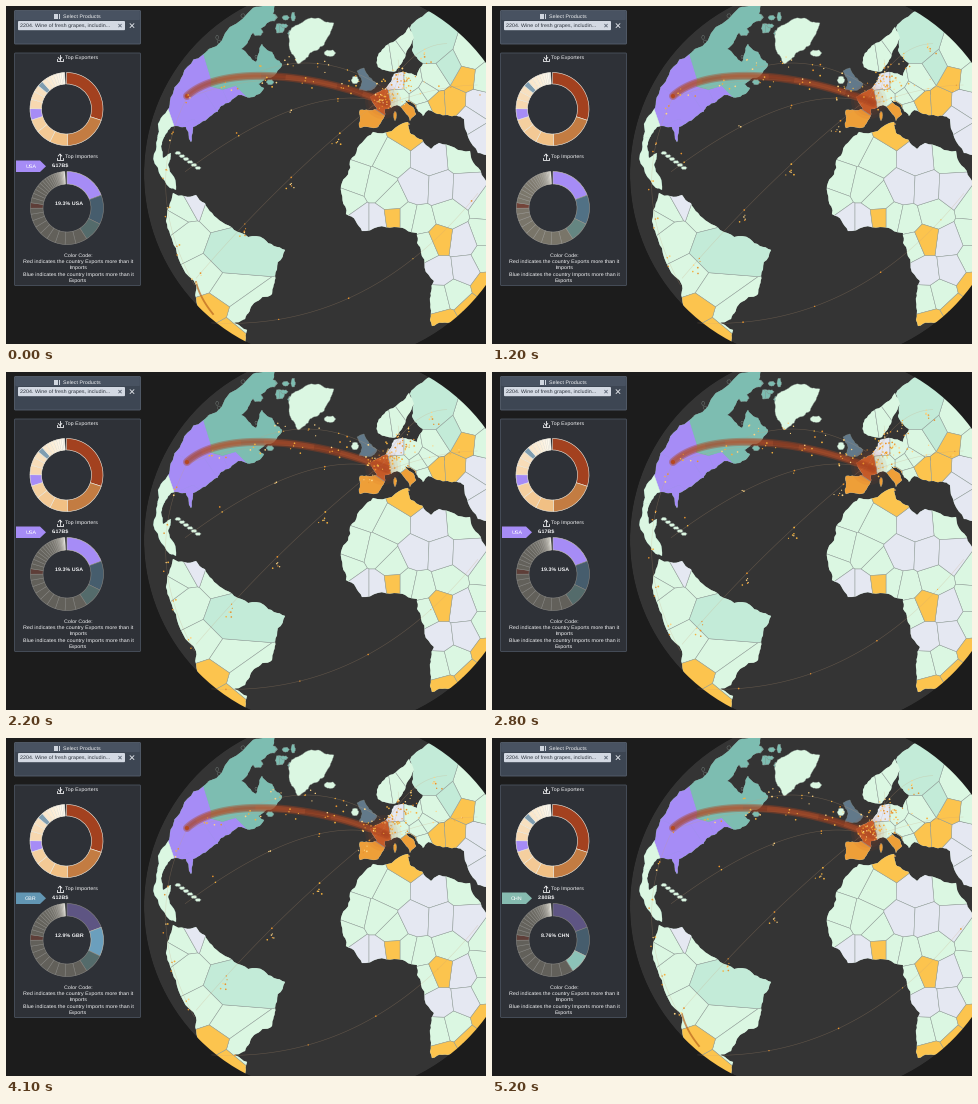
Write a matplotlib script that moves like this. It is 480x338 px and loops after 5300 ms.

```python
import numpy as np
import matplotlib.pyplot as plt
from matplotlib.animation import FuncAnimation
from matplotlib.colors import to_rgb
from matplotlib.patches import Circle, FancyBboxPatch, Polygon, Rectangle, Wedge

W, H = 480, 338
FRAMES, INTERVAL, PERIOD = 53, 100, 1700
BG, SEA, PANEL, INK = "#1c1c1c", "#343434", "#2e3137", "#f1f2f4"
MINT, PALE, TEAL, RUST = "#dbf7e2", "#c3ebd8", "#7dbdb1", "#c9622f"
LAV, YELLOW, AMBER = "#e5e8f2", "#fcc44e", "#ee9f38"
PURPLE, BLUE, SLATE = "#a68cf6", "#6b9fbd", "#62798a"
CENTER, RADIUS = (327, 168), 189

plt.rcParams.update({"font.family": "Liberation Sans", "text.hinting": "none"})
rng = np.random.default_rng(7)
fig = plt.figure(figsize=(4.8, 3.38), dpi=100, facecolor=BG)
ax = fig.add_axes([0, 0, 1, 1])
ax.set_xlim(0, W)
ax.set_ylim(H, 0)
ax.axis("off")


def mix(a, b, t):
    return tuple(np.array(to_rgb(a)) * (1 - t) + np.array(to_rgb(b)) * t)


# Globe
ax.add_patch(Circle(CENTER, RADIUS, fc=SEA, lw=0))
ax.add_patch(Wedge(CENTER, 500, 0, 360, width=500 - RADIUS, fc=BG, lw=0, zorder=2.8))


def rough(points, amount=0.12, rounds=3):
    """Subdivide a closed outline with random offsets, like a coast."""
    p = np.array(points, float)
    for _ in range(rounds):
        d = np.roll(p, -1, axis=0) - p
        normal = np.stack([-d[:, 1], d[:, 0]], axis=1)
        mid = p + d / 2 + normal * rng.uniform(-amount, amount, (len(p), 1))
        p = np.stack([p, mid], axis=1).reshape(-1, 2)
    return p


def cell(seed, seeds):
    """Part of the stage that lies nearer to seed than to the other seeds."""
    poly = [np.array(c, float) for c in ((0, -50), (600, -50), (600, 400), (0, 400))]
    for other in seeds:
        if other == seed:
            continue
        normal = np.subtract(other, seed)
        limit = normal @ np.add(other, seed) / 2
        kept = []
        for a, b in zip(poly, poly[1:] + poly[:1]):
            da, db = normal @ a - limit, normal @ b - limit
            if da <= 0:
                kept.append(a)
            if da * db < 0:
                kept.append(a + (b - a) * da / (da - db))
        poly = kept
    return poly


def land(color, outline, countries=None, border="#8f9a96"):
    """Coast outline, split into countries around seed points."""
    shape = ax.add_patch(Polygon(rough(outline), fc=color, ec="#7f8a85", lw=0.25, zorder=2))
    countries = countries or {}
    seeds = [s for group in countries.values() for s in group]
    for fill, group in countries.items():
        for seed in group:
            part = Polygon(cell(seed, seeds), fc=fill, ec=border or fill, lw=0.35, zorder=2.1)
            ax.add_patch(part).set_clip_path(shape)


def blob(x, y, rx, ry, color):
    a = np.linspace(0, 2 * np.pi, 7)[:-1]
    land(color, np.stack([x + rx * np.cos(a), y + ry * np.sin(a)], axis=1))


# North America
land(TEAL, [(247, 2), (203, 43), (177, 69), (164, 95), (152, 118), (148, 148), (164, 182),
            (170, 184), (162, 159), (165, 147), (157, 152), (156, 136), (165, 121),
            (180, 121), (185, 136), (187, 121), (206, 109), (215, 100), (232, 89),
            (247, 91), (258, 82), (252, 78), (266, 71), (276, 58), (266, 46), (256, 38),
            (250, 56), (235, 43), (245, 29), (266, 13), (270, -3)],
     {PURPLE: [(190, 70), (215, 95), (174, 105), (184, 128), (200, 105), (226, 90)],
      TEAL: [(216, 62), (221, 73), (240, 76), (230, 40)],
      MINT: [(154, 112), (160, 150)]}, border=None)
for _ in range(9):
    x, y = rng.normal((272, 22), (8, 11))
    blob(x, y, *rng.uniform(2, 5.5, 2), TEAL)
for _ in range(8):
    x, y = rng.normal((228, 36), (13, 13))
    blob(x, y, *rng.uniform(0.8, 2.2, 2), SEA)
for k in range(4):
    blob(205 + 5 * k, 79 + 1.6 * k, 3, 1.6, SEA)
for k in range(6):
    blob(172 + 4 * k, 147 + 3 * k, 3.2, 1.7, MINT)
blob(264, 76, 4, 3, TEAL)
land(MINT, [(283, 26), (298, 15), (313, 12), (328, 17), (318, 39), (304, 47), (292, 58),
            (284, 44)])
blob(324, 47, 6, 3.5, MINT)

# South America
land(MINT, [(167, 187), (190, 189), (206, 207), (228, 224), (258, 233), (279, 244),
            (269, 270), (266, 288), (248, 297), (239, 313), (228, 317), (241, 324),
            (236, 345), (212, 342), (195, 305), (190, 279), (170, 242), (160, 215)],
     {MINT: [(174, 202), (178, 232), (198, 272), (219, 286), (236, 310), (210, 200),
             (166, 216)],
      PALE: [(222, 248)], LAV: [(190, 193)], YELLOW: [(208, 302), (222, 327)]})

# Europe and western Asia
land(MINT, [(354, 104), (371, 103), (364, 91), (380, 82), (388, 68), (411, 70), (417, 57),
            (406, 44), (404, 22), (425, 5), (490, 0), (490, 152), (472, 147), (458, 113),
            (442, 109), (422, 104), (417, 110), (409, 99), (399, 94), (410, 108),
            (404, 115), (391, 99), (379, 103), (372, 121), (354, 122)],
     {AMBER: [(362, 112), (404, 106)], RUST: [(375, 93)],
      LAV: [(391, 77), (472, 98), (463, 112), (477, 135)],
      MINT: [(405, 77), (414, 90), (418, 104), (428, 73), (420, 86), (463, 53), (478, 72),
             (392, 90)],
      YELLOW: [(431, 98), (447, 97), (459, 70)], PALE: [(428, 42), (445, 62)]})
blob(440, 85, 10, 4.5, SEA)
blob(470, 85, 4, 9, SEA)
land(MINT, [(372, 61), (371, 52), (384, 37), (403, 21), (408, 32), (397, 54), (390, 65)],
     {MINT: [(378, 50), (391, 48), (402, 40)]})
land(SLATE, [(353, 84), (356, 75), (351, 65), (358, 62), (371, 78), (367, 83)])
blob(349, 74, 4, 4, MINT)
blob(401, 118, 3, 1.6, AMBER)
blob(389, 110, 1.6, 5, AMBER)

# Africa
land(MINT, [(367, 126), (402, 116), (405, 128), (425, 143), (433, 137), (464, 145),
            (478, 172), (495, 196), (495, 280), (470, 300), (447, 316), (426, 320),
            (424, 295), (428, 275), (415, 246), (411, 227), (388, 221), (356, 225),
            (340, 208), (335, 180), (344, 155), (361, 131)],
     {MINT: [(385, 152), (362, 140), (350, 175), (372, 180), (386, 194), (401, 212),
             (415, 215), (420, 239), (458, 150), (482, 200), (442, 208), (480, 227),
             (480, 252), (433, 292), (449, 288), (342, 197)],
      LAV: [(424, 153), (411, 182), (434, 183), (460, 184), (354, 214), (372, 214),
            (456, 236), (434, 266), (459, 263)],
      YELLOW: [(402, 124), (387, 212), (434, 233), (440, 318), (464, 304), (482, 280)]})


# Trade routes
def bezier(points, u):
    """Curve through any number of control points at u."""
    p = [np.asarray(q, float) for q in points]
    u = np.asarray(u)[..., None]
    while len(p) > 1:
        p = [a * (1 - u) + b * u for a, b in zip(p, p[1:])]
    return p[0]


HUB, EAST, ANDES = (378, 95), (181, 90), (192, 278)
# start, control, end, dots per lane, lanes, spread
ROUTES = [
    (HUB, (285, 170), ANDES, 4, 6, 11),
    (HUB, (300, 90), (178, 160), 4, 2, 10),
    (HUB, (290, 52), EAST, 5, 5, 8),
    (HUB, (320, 45), (250, 62), 4, 5, 10),
    (HUB, (400, 50), (445, 40), 3, 7, 9),
    (HUB, (390, 75), (400, 75), 3, 18, 20),
    (HUB, (430, 60), (470, 85), 3, 3, 10),
    (ANDES, (135, 185), EAST, 5, 3, 6),
    ((205, 318), (360, 325), (470, 190), 4, 1, 4),
]
u_line = np.linspace(0, 1, 60)
lanes = []
for start, bend, end, count, copies, spread in ROUTES:
    for n in range(copies):
        curve = [np.add(q, rng.normal(0, spread * s, 2))
                 for q, s in ((start, 0.45), (bend, 0.8), (end, 0.5))]
        lanes.append((curve, count, rng.uniform(-0.15, 0.15)))
        if n == 0:
            ax.plot(*bezier(curve, u_line).T, color="#c9a078", lw=0.4, alpha=0.3, zorder=3)

for r in range(3, 19, 3):
    ax.add_patch(Circle((377, 95), r, fc="#c4481c", alpha=0.07, lw=0, zorder=3.1))

BAND = [EAST, (215, 58), (310, 67), (381, 97)]
for width, alpha in ((5.8, 0.38), (4, 0.42), (1.5, 0.25)):
    ax.plot(*bezier(BAND, u_line).T, color="#a8421f", lw=width, alpha=alpha, zorder=3.2,
            solid_capstyle="round")
pulses = [ax.plot([], [], color="#d0693a", lw=3.6, alpha=0.2, zorder=3.3)[0] for _ in range(3)]
ax.add_patch(Circle(EAST, 2, fc="#b5481f", lw=0, zorder=3.3))
streak, = ax.plot(*bezier([(190, 276), (194, 292), (207, 308)], u_line).T, color="#b8651f",
                  lw=1.3, alpha=0.7, zorder=3.3)

n_dots = sum(count for _, count, _ in lanes)
dots = ax.scatter(np.zeros(n_dots), np.zeros(n_dots), s=rng.uniform(0.6, 1.7, n_dots),
                  c=rng.choice(["#f5b23e", "#e8932e", "#ffd584"], n_dots), lw=0, zorder=4)


# Side panels
def text(x, y, s, color=INK, ha="center", **kw):
    return ax.text(x, y, s, color=color, ha=ha, va="center", fontsize=5.4 * 0.72,
                   zorder=7, **kw)


def box(x, y, w, h, fc, ec="none", r=1):
    ax.add_patch(FancyBboxPatch((x + r, y + r), w - 2 * r, h - 2 * r, fc=fc, ec=ec, lw=0.6,
                                boxstyle=f"round,pad={r}", zorder=5))


def stroke(xs, ys, color=INK, lw=0.6):
    ax.plot(xs, ys, color=color, lw=lw, zorder=7)


def tray_icon(x, y, up):
    stroke([x - 3.3, x - 3.3, x + 3.3, x + 3.3], [y + 0.8, y + 3, y + 3, y + 0.8])
    stroke([x, x], [y - 3, y + 1.5])
    tip, base = (y - 3, y - 1) if up else (y + 1.5, y - 0.5)
    stroke([x - 1.8, x, x + 1.8], [base, tip, base])


def cross(x, y, r, color):
    for s in (-1, 1):
        stroke([x - r, x + r], [y - s * r, y + s * r], color)


box(8.5, 4.5, 126, 33.5, "#3d4653", "#56606e")
box(9.2, 5, 124.6, 9, "#485261")
for k in range(3):
    ax.add_patch(Rectangle((48 + 2.3 * k, 7.5), 1.8, 5, fc="#cfd5de", lw=0, zorder=6))
text(76, 10.2, "Select Products")
box(12, 15, 107, 9.2, "#d3d9e3")
text(14.5, 19.6, "2204. Wine of fresh grapes, includin...", "#2c333d", "left")
cross(114, 19.6, 1.3, "#5c6675")
cross(126, 19.6, 1.9, "#e6e9ee")

box(8.5, 47, 126, 232.5, PANEL, "#4b535f")
for y, name, up in ((52, "Top Exporters", False), (151, "Top Importers", True)):
    tray_icon(54, y, up)
    text(75.5, y, name)
NOTE = """Color Code:
Red indicates the country Exports more than it
Imports
Blue indicates the country Imports more than it
Exports"""
for k, line in enumerate(NOTE.splitlines()):
    text(72, 249.2 + 6.4 * k, line)


def shrinking(n, ratio, total):
    sizes = ratio ** np.arange(n)
    return list(sizes * total / sizes.sum())


def donut(center, sizes, colors, width):
    """Clockwise ring of slices starting at the top."""
    edges = np.concatenate([[0], np.cumsum(sizes)]) - 90
    return [ax.add_patch(Wedge(center, 36.5, a, b, width=width, fc=c, ec="#f4f1e6",
                               lw=0.4, zorder=6))
            for a, b, c in zip(edges, edges[1:], colors)]


creams = [mix("#f1c084", "#fffdf4", (k / 15) ** 0.7) for k in range(16)]
creams[3], creams[7] = PURPLE, "#7f9db0"
donut((60.5, 103), [108, 70] + shrinking(16, 0.85, 179), ["#a3411f", "#c37c42"] + creams, 11.5)

TAIL = 28
fade = np.concatenate([[0, 0, 0], np.linspace(0, 1, TAIL) ** 5])
import_colors = [PURPLE, BLUE, "#8cc3b8"] + [mix("#b0a68e", "white", t) for t in fade[3:]]
import_colors[12] = "#a5523a"
slices = donut((61, 202), [69.5, 46.5, 31.5] + shrinking(TAIL, 0.92, 209), import_colors, 12.5)

# Hover card
CARDS = {"USA": (0, "6.17B$", "19.3%", PURPLE),
         "GBR": (1, "4.12B$", "12.9%", "#6296b3"),
         "CHN": (2, "2.80B$", "8.76%", "#86bbb0")}
HOVER = [(0, "USA"), (4, None), (15, "USA"), (33, "GBR"), (48, "CHN")]
tag = ax.add_patch(Polygon([(10, 154.5), (34, 154.5), (40, 160.3), (34, 166), (10, 166)],
                           lw=0, zorder=6))
code = text(25, 160.4, "", "white")
value = text(54.5, 160.4, "", weight="bold")
share = text(63, 198, "", weight="bold")


def hovered(i):
    return [name for start, name in HOVER if start <= max(i, 0)][-1]


def strength(k, i):
    name = hovered(i)
    active = CARDS[name][0] if name else 0
    base = 1 if k == active else 0.4 if name else 0.58
    return base + (1 - base) * fade[k]


def update(i):
    phase = i * INTERVAL / PERIOD % 1
    dots.set_offsets(np.concatenate([
        bezier(curve, (np.arange(count) + phase + shift) / count % 1)
        for curve, count, shift in lanes]))
    for k, pulse in enumerate(pulses):
        u = np.clip(np.linspace(0, 0.2, 20) + (k + 1 - phase) / 3 - 0.1, 0, 1)
        pulse.set_data(*bezier(BAND, u).T)
    streak.set_visible(phase < 0.15 or phase > 0.9)

    for k, part in enumerate(slices):
        level = (strength(k, i) + strength(k, i - 1)) / 2
        part.set_facecolor(mix(PANEL, import_colors[k], level))
        part.set_edgecolor(mix(PANEL, "#e4dfd0", 0.25 + 0.6 * level))

    name = hovered(i)
    for item in (tag, code, value, share):
        item.set_visible(name is not None)
    if name:
        _, amount, percent, color = CARDS[name]
        tag.set_facecolor(color)
        code.set_text(name)
        value.set_text(amount)
        share.set_text(f"{percent} {name}")


anim = FuncAnimation(fig, update, frames=FRAMES, interval=INTERVAL, init_func=lambda: update(0),
                     repeat=True)
plt.show()
```
